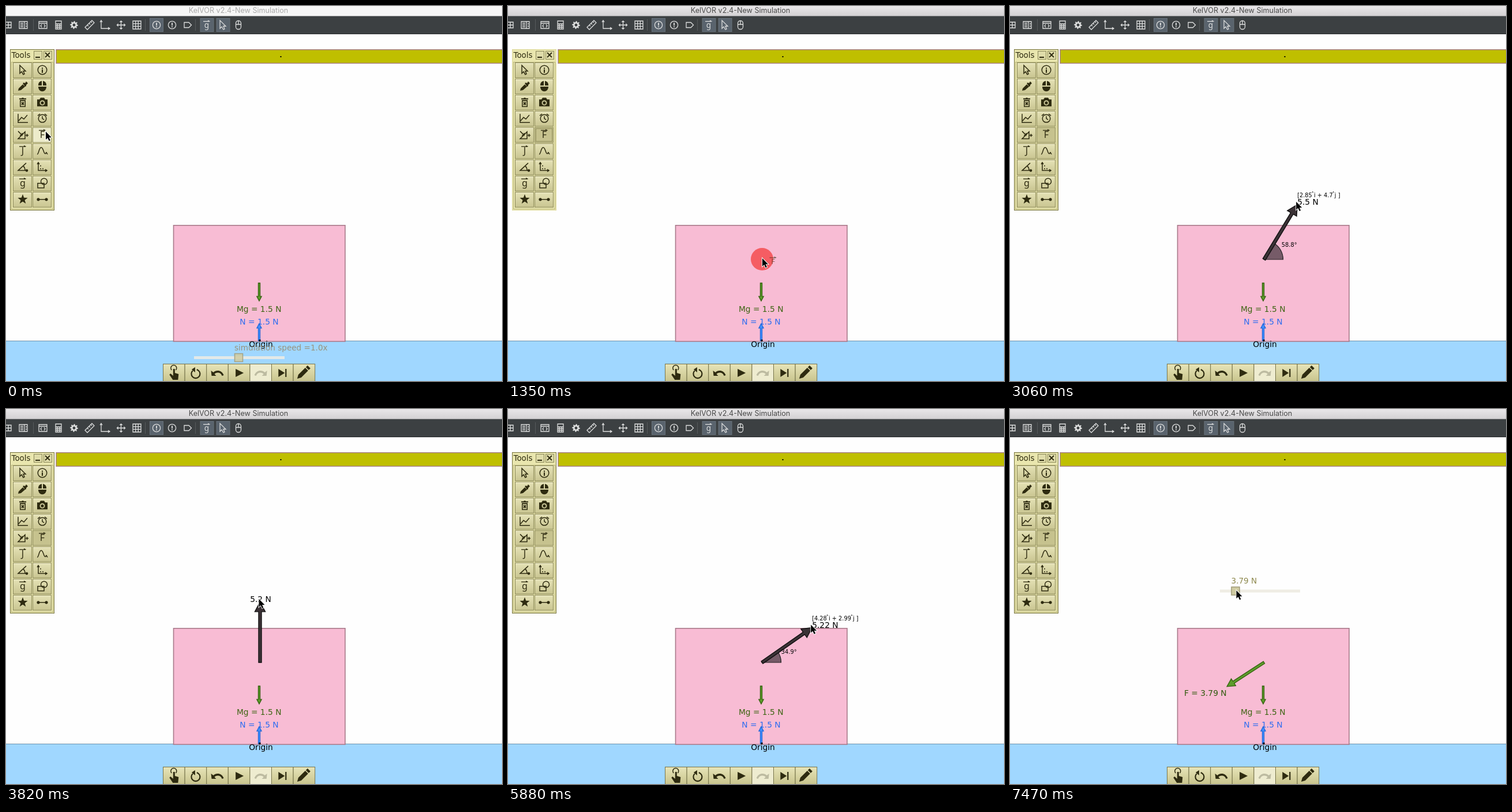
An HTML page with a canvas for the animation above (8000 ms loop, 860 by 651 pixels).

```html
<!DOCTYPE html>
<html lang="en">
<head>
<meta charset="utf-8">
<title>Force simulation</title>
<style>
  html, body { margin: 0; width: 100%; height: 100%; overflow: hidden; background: #fefefe; }
  canvas { display: block; }
</style>
</head>
<body>
<canvas id="stage" width="860" height="651"></canvas>
<script>
const ctx = document.getElementById('stage').getContext('2d');
const LOOP = 8000, PX_PER_N = 20.25, TAIL = [440.5, 440];
const INK = '#2e2b10', PALE = '#dcdddd', LABEL = 13.8, SMALL = 9.8;

// ---- motion: [time, ...values], eased between keys
const POINTER = [[0, 69, 218], [120, 69, 218], [180, 107, 235], [410, 107, 235], [1090, 441, 438]];
// angle in degrees, size in newtons
const FORCE = [
  [1370, 49.4, 0.1], [2120, 49.4, 1.27], [2290, 49.4, 1.27], [3060, 58.8, 5.5], [3120, 58.8, 5.5],
  [3290, 86.4, 5.16], [3590, 86.4, 5.16], [3800, 90, 5.2], [4350, 90, 5.2], [4880, -4.5, 4.65],
  [5060, -4.5, 4.65], [5170, 0, 5.29], [5240, 0, 5.29], [5870, 34.9, 5.22], [5890, 34.9, 5.22],
  [6090, 130, 4.4], [6300, 213, 4.8], [6710, 213, 4.8], [7000, 213, 7.3], [7460, 213, 3.79]
];
const THUMB = [[6710, 433.5], [7000, 451], [7460, 391]];

function at(keys, t) {
  if (t <= keys[0][0]) return keys[0].slice(1);
  const i = keys.findIndex(k => k[0] > t);
  if (i < 0) return keys[keys.length - 1].slice(1);
  const a = keys[i - 1], b = keys[i], u = (t - a[0]) / (b[0] - a[0]), e = u * u * (3 - 2 * u);
  return a.slice(1).map((v, n) => v + (b[n + 1] - v) * e);
}

// ---- drawing helpers
function box(x, y, w, h, fill, stroke, width = 1) {
  if (fill) { ctx.fillStyle = fill; ctx.fillRect(x, y, w, h); }
  if (stroke) { ctx.strokeStyle = stroke; ctx.lineWidth = width; ctx.strokeRect(x, y, w, h); }
}
function text(s, x, y, size, color, align = 'left', family = '"DejaVu Sans"') {
  ctx.font = `${size}px ${family}, sans-serif`;
  ctx.fillStyle = color;
  ctx.textAlign = align;
  ctx.fillText(s, x, y);
}
function shade(y, h, top, bottom) {
  const g = ctx.createLinearGradient(0, y, 0, y + h);
  g.addColorStop(0, top);
  g.addColorStop(1, bottom);
  return g;
}
// Stroked path, then filled path, both centred on x, y
function icon(x, y, color, line, solid, width = 1.5) {
  ctx.save();
  ctx.translate(x, y);
  ctx.strokeStyle = ctx.fillStyle = color;
  ctx.lineWidth = width;
  if (line) ctx.stroke(new Path2D(line));
  if (solid) ctx.fill(new Path2D(solid), 'evenodd');
  ctx.restore();
}
const ring = (r, x = 0, y = 0) => `M${x - r} ${y}a${r} ${r} 0 1 0 ${2 * r} 0a${r} ${r} 0 1 0 ${-2 * r} 0z`;
function vector(letter, x, y, color, size = 16) {
  text(letter, x, y + size * .36, size, color, 'center', '"Noto Sans"');
  icon(x, y - size * .47, color, 'M-6 0H5', 'M2-2.2L6.5 0 2 .6z', 1.3);
}
function arrow(x, y, angle, length, fill, stroke) {
  const head = Math.min(length, 4 + length * .125), half = head * .53, s = 1.1 + length * .0135, n = length - head;
  ctx.save();
  ctx.translate(x, y);
  ctx.rotate(-angle * Math.PI / 180);
  const p = new Path2D(`M0 ${-s}H${n}V${-half}L${length} 0 ${n} ${half}V${s}H0z`);
  ctx.fillStyle = fill;
  ctx.strokeStyle = stroke;
  ctx.lineWidth = 1.3;
  ctx.fill(p);
  ctx.stroke(p);
  ctx.restore();
}
function pointer(x, y) {
  const d = 'M0 0V14L3.2 11 5.6 16.2 7.9 15.2 5.6 10.2H10z';
  icon(x, y, '#fff', d, '', 1.8);
  icon(x, y, '#000', '', d);
}
function slider(x, width, y, thumb, label, color) {
  box(x, y - 2.5, width, 5, '#efede4');
  box(thumb - 7, y - 7, 14, 14, '#d0cca2', '#a09b78', 1.5);
  text(label, thumb - 7.5, y - 13, 13.6, color);
}

// ---- icons
const ARROW = 'M-5-8V6L-2 3 1 8 3 7 1 2H5z';
const GEAR = (() => {
  let d = '';
  for (let i = 0; i < 32; i++) {
    const r = i % 4 < 2 ? 7 : 5, a = i * Math.PI / 16;
    d += `${i ? 'L' : 'M'}${r * Math.cos(a)} ${r * Math.sin(a)}`;
  }
  return d + 'z' + ring(2.4);
})();
const STAR = 'M' + Array.from({ length: 10 }, (_, i) => {
  const r = i % 2 ? 3.7 : 9, a = i * Math.PI / 5;
  return `${r * Math.sin(a)} ${-r * Math.cos(a)}`;
}).join('L') + 'z';
const ALERT = [ring(6.6), 'M-.9-4h1.8v5h-1.8zM-.9 2.3h1.8v1.8h-1.8z'];
const AXES = 'M-7-7V6H7M-9-5L-7-8-5-5M5 4L8 6 5 8';

const TOP_ICONS = [
  [4, 'M-6-5H5V5H-6zM-6 0H5M0-5V5'],
  [30, 'M-7-6H7V6H-7zM2-6V6M-5-3H0M-5 0H0M-5 3H0M4-2H6M4 2H6'],
  [64, 'M-7-6H7V6H-7zM-7-3H7M-2-1L-4 1.5-2 4M2-1L4 1.5 2 4'],
  [91, 'M-5-7H5V7H-5zM-5-2H5M-5 1H5M-5 4H5M-2-2V7M2-2V7'],
  [118, '', GEAR],
  [145, 'M-8 4L4-8 8-4-4 8zM-4 0L-2 2M-1-3L1-1M2-6L4-4'],
  [172, AXES],
  [199.5, 'M-6 0H6M0-6V6', 'M-8 0l3-3v6zM8 0l-3-3v6zM0-8l-3 3h6zM0 8l-3-3h6z'],
  [227, 'M-7-7H7V7H-7zM-7-2.3H7M-7 2.3H7M-2.3-7V7M2.3-7V7'],
  [261, ...ALERT],
  [288, ...ALERT],
  [315, 'M-6-4.5H2L6.5 0 2 4.5H-6z'],
  [376, ARROW],
  [403, 'M-4.5-3a4.5 4.5 0 0 1 9 0V3a4.5 4.5 0 0 1-9 0zM-4.5-1H4.5M0-7V-1']
];

const TOOLS = [
  [ARROW], [ring(7.8), 'M-1-4h2v2h-2zM-1-1h2v6h-2z'],
  ['', 'M-8 8L-7 4 0-3 4 1-3 7zM0-5L2-6 4-5 6-8 9-5 6-2 6 0 4 1z'],
  ['', 'M-1-9V-1H-7C-7-6-5-8-1-9zM1-9C5-8 7-6 7-1H1zM-7 1H7C7 12-7 12-7 1z'],
  ['M-2 0L2 4.5M2 0L-2 4.5', 'M-6-7H-2L-1-8H1L2-7H6V-5H-6zM-5-4H5V8H-5zM-3.5-2V6.5H3.5V-2z', 2],
  ['', 'M-9-5H-5L-3-8H3L5-5H9V7H-9z' + ring(4.4, 0, 1) + ring(2.6, 0, 1)],
  ['M-8-8V7H9M-7 4L-2-2 2 1 8-6'],
  [ring(6.8) + 'M0-4V0L3 2M-8-5L-4-8M8-5L4-8'],
  ['M-8 7H4V-5zM-8-6L-1 1M-1-3V1H-5M5 1H10M7.5-1.5V3.5'], 'F',
  'J', ['M-9 6C-6 6-6-6-2-6S2 5 5 5 5-1 9 6'],
  ['M8 6H-8L6-7M1-2C3 0 4 3 4 6' + ring(1.6, 7, 6)], [AXES + 'M-4 3H-2M0 3H2M-4-2H-2'],
  'g', ['M-8 0H3V8H-8z' + ring(5.5, 3, -3)],
  ['', STAR], ['M-7 0H7', ring(2.6, -7) + ring(2.6, 7)]
];

const UNDO = 'M-11-4L-10 5H-2L-5 2C-1-2 6-1 8 5L11 4C8-5-2-6-7-1z';
const REDO = 'M11-4L10 5H2L5 2C1-2-6-1-8 5L-11 4C-8-5 2-6 7-1z';
const CONTROLS = [
  ['M-4-5a5 5 0 1 1 7 0', 'M-1.5-7h3V0L8 2 7 12H-2L-8 3-6 1-1.5 5z'],
  ['M-5-4A7.5 7.5 0 1 0 5-4L2-6', 'M-1-10V-1L-7-6z', 2.2],
  ['', UNDO], ['', 'M-6-7L8 0-6 7z'], ['', REDO],
  ['M6-7V7', 'M-7-7L4 0-7 7z', 2.2],
  ['', 'M-12 10L-10 3 2-9 7-4-5 8zM3-10L6-13 11-8 8-5z']
];

// ---- scene parts
function titleAndToolbar(active) {
  box(0, 0, 860, 18, active ? shade(0, 18, '#e9e7e9', '#d2d0d2') : '#f6f6f6');
  text('KelVOR v2.4-New Simulation', 403, 12, 12.6, active ? '#484848' : '#a9a9a9', 'center', 'Inter');
  box(0, 17.5, 860, 31.5, '#3c4042');
  box(0, 48, 860, 1, '#292c2e');
  for (const x of [261, 348.5, 376.5]) box(x - 11.5, 21.5, 23, 23, '#59636d', '#68727b');
  for (const x of [47, 241, 328]) box(x, 23, 1, 20, '#565a5c');
  for (const [x, line, solid] of TOP_ICONS) icon(x, 33, PALE, line, solid, 1.3);
  vector('g', 348, 33, PALE, 13.5);
}

function toolPanel(focused, mode) {
  box(7.5, 75.5, 76, 279, '#e9e6ae', focused ? '#74713c' : '#dcd89a');
  box(9.5, 97.5, 72, 255, null, '#b8b47b');
  text('Tools', 9.5, 90, 13.4, INK);
  for (const x of [48.5, 65.5]) box(x, 78.5, 14, 14, '#dfdca9', '#8a8758');
  icon(55, 89, INK, 'M-4 0H4', '', 2);
  icon(72, 85, INK, 'M-4-4L4 4M4-4L-4 4', '', 1.8);
  TOOLS.forEach((tool, i) => {
    const x = 12.5 + (i % 2) * 34, y = 98.5 + Math.floor(i / 2) * 28.1, isForce = i === 9;
    let fill = shade(y, 26, '#e5e2b6', '#c9c591');
    if (isForce) fill = mode === 'hover' ? '#ecebca' : '#c6c28e';
    box(x, y, 32, 26, fill, '#8b8859');
    if (!isForce) box(x + 1, y + 1, 30, 1, '#f0edcb');
    if (isForce && mode === 'pressed') {
      ctx.setLineDash([1, 1]);
      box(x + 2, y + 2, 28, 22, null, '#65622f');
      ctx.setLineDash([]);
    }
    const cx = x + 16.5, cy = y + 12.5;
    if (typeof tool === 'string') vector(tool, cx, cy, INK);
    else icon(cx, cy, INK, tool[0], tool[1], tool[2]);
  });
}

function world() {
  box(0, 581.5, 860, 70, '#a0d7ff');
  box(0, 581, 860, 1, '#6f94ad');
  box(87, 75.8, 780, 23.6, '#bfbf00', '#a98186', 1.5);
  box(475.5, 87, 2, 2, '#000');
  box(290.5, 380.8, 297.5, 201.5, '#f8bcd4', '#a87a8a', 1.6);
  text('Mg = 1.5 N', 438.7, 531, LABEL, '#3c6412', 'center');
  arrow(439, 481, -90, 31, '#5d9c2b', '#34600f');
  text('N = 1.5 N', 439, 553, LABEL, '#2c6cf0', 'center');
  arrow(439, 581, 90, 29.5, '#4391ff', '#2468d8');
  box(438.5, 579, 3, 3, '#000');
  text('Origin', 442, 592, LABEL, '#000', 'center');
}

function controls() {
  CONTROLS.forEach(([line, solid, width], i) => {
    const x = 272.5 + i * 37.6, off = i === 4;
    box(x, 621.5, 37.6, 31, off ? '#eeecd0' : shade(621, 30, '#e8e5b9', '#c9c58e'), '#77744a');
    icon(x + 18.8, 637, off ? '#bdbba1' : INK, line, solid, width);
  });
}

const digits = v => String(Number(v.toPrecision(3)));

function tipOf(angle, newtons) {
  const a = angle * Math.PI / 180, r = newtons * PX_PER_N;
  return [TAIL[0] + r * Math.cos(a), TAIL[1] - r * Math.sin(a)];
}
function pointerAtTip(angle, newtons) {
  const [x, y] = tipOf(angle, newtons);
  return [x - 2, y - 5];
}

function componentLabel(i, j, x, y, leftward) {
  const head = '[' + digits(i), middle = head + ' i + ' + digits(j), full = middle + ' j ]';
  ctx.font = `${SMALL}px "DejaVu Sans", sans-serif`;
  if (leftward) x -= ctx.measureText(full).width;
  const marks = [head, middle].map(s => x + ctx.measureText(s).width);
  text(full, x, y, SMALL, '#000');
  for (const m of marks) text('ˆ', m - 1.5, y - 1, SMALL, '#000');
}

function draggedForce(angle, newtons) {
  const [x, y] = tipOf(angle, newtons), length = newtons * PX_PER_N, label = digits(newtons) + ' N';
  const flat = Math.abs(angle) < .6, upright = Math.abs(angle - 90) < .6;
  const a = angle * Math.PI / 180, r = Math.min(33, length * .55);
  if (!flat && !upright) {
    ctx.beginPath();
    ctx.moveTo(...TAIL);
    ctx.arc(...TAIL, r, 0, -a, angle > 0);
    ctx.closePath();
    ctx.fillStyle = 'rgba(50,40,46,.65)';
    ctx.strokeStyle = '#222';
    ctx.lineWidth = 1.2;
    ctx.fill();
    ctx.stroke();
  }
  arrow(...TAIL, angle, length, '#3b3236', '#0c0c0c');
  if (flat) text(label, x + .5, y + 7.5, LABEL, '#000');
  else if (upright) text(label, x + 1, y, LABEL, '#000', 'center');
  else {
    const left = Math.cos(a) < 0, base = y + (Math.sin(a) < 0 ? 14 : .7);
    text(label, x, base, LABEL, '#000', left ? 'right' : 'left');
    componentLabel(newtons * Math.cos(a), newtons * Math.sin(a), x, base - 13.3, left);
    const shown = angle > 180 ? angle - 360 : angle;
    text(digits(shown) + '°', TAIL[0] + (r + 3) * Math.cos(a / 2) - 1, TAIL[1] - (r + 3) * Math.sin(a / 2) - 4, SMALL, '#000');
  }
}

function appliedForce(angle, newtons) {
  const [x, y] = tipOf(angle, newtons);
  arrow(...TAIL, angle, newtons * PX_PER_N, '#5d9c2b', '#34600f');
  text(`F = ${digits(newtons)} N`, x - .5, y + 16, LABEL, '#2f5a0c', 'right');
}

function draw(t) {
  const clicked = t >= 440, dragStart = 1370, release = 6300;
  const [angle, newtons] = at(FORCE, t);
  box(0, 0, 860, 651, '#fefefe');
  world();
  titleAndToolbar(clicked);
  toolPanel(!clicked || t >= dragStart, !clicked ? 'hover' : t < dragStart ? 'pressed' : 'selected');

  ctx.globalAlpha = .85 * Math.max(0, Math.min(1, (1050 - t) / 600));
  slider(326, 157, 610.5, 403.5, 'simulation speed =1.0x', '#988765');
  ctx.globalAlpha = 1;
  controls();

  let cursor;
  if (t < dragStart) {
    cursor = at(POINTER, t);
    if (t >= 1090) icon(440.5, 439.5, 'rgba(245,70,72,.8)', '', ring(19.5));
    if (clicked) {
      ctx.globalAlpha = .55;
      vector('F', cursor[0] + 18.5, cursor[1] + 5, INK, 13);
      ctx.globalAlpha = 1;
    }
  } else if (t < release) {
    draggedForce(angle, newtons);
    cursor = pointerAtTip(angle, newtons);
  } else {
    appliedForce(angle, newtons);
    const [thumb] = at(THUMB, t);
    if (t >= 6420) slider(364, 139, 316, thumb, digits(newtons) + ' N', '#8e894e');
    cursor = t < 6710 ? at([[release, ...pointerAtTip(angle, newtons)], [6650, 435, 315]], t) : [thumb + 1.5, 315];
  }
  pointer(...cursor);
}

const start = performance.now();
function frame() {
  draw((performance.now() - start) % LOOP);
  requestAnimationFrame(frame);
}
frame();
</script>
</body>
</html>
```
